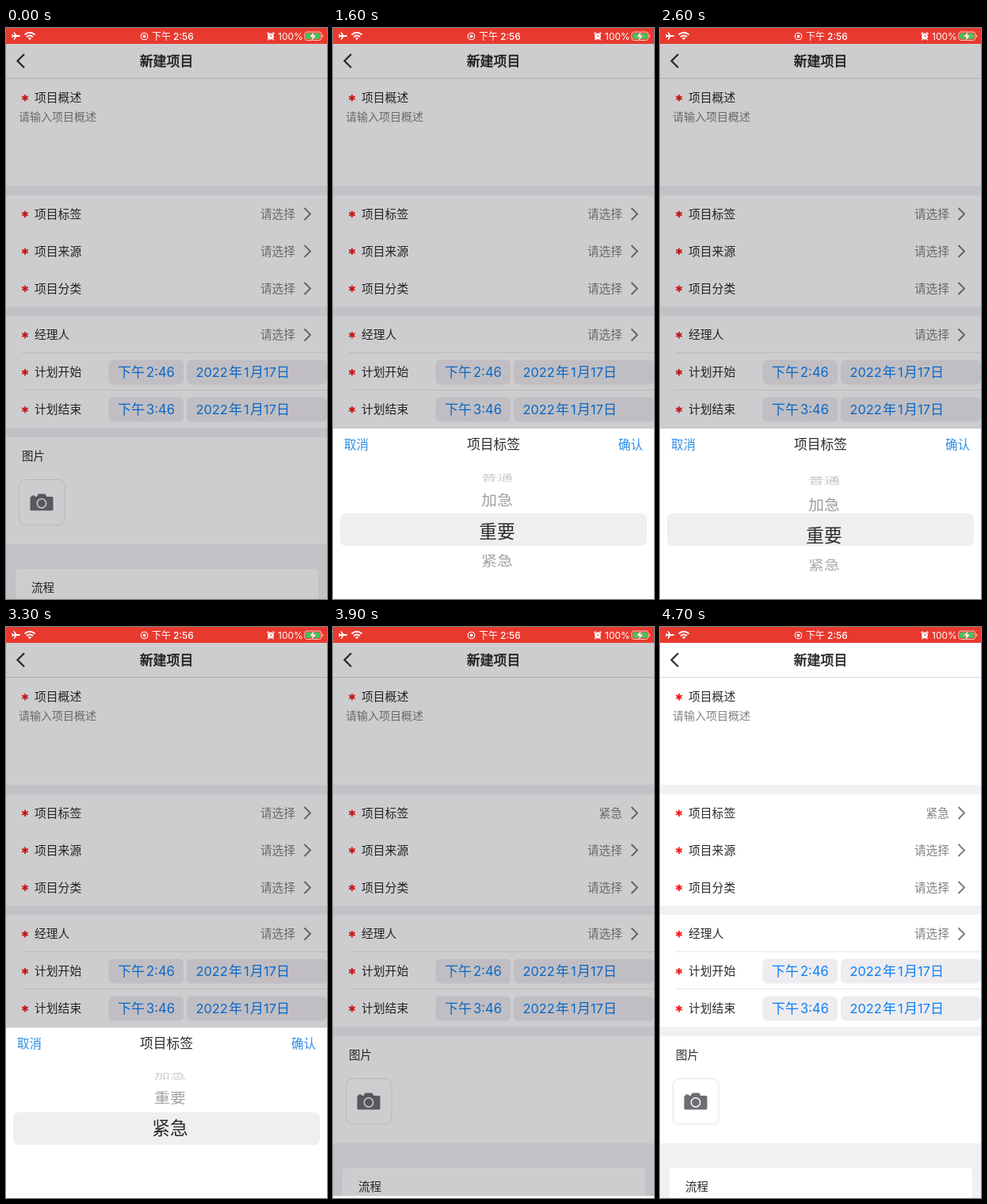
Recreate the animation shown at these times as an HTML page. Size 405 px wide and 720 px high, loop 4.8 s.

```html
<!DOCTYPE html>
<html lang="zh-CN">
<head>
<meta charset="utf-8">
<style>
html, body { margin: 0; width: 100%; height: 100%; overflow: hidden; background: #fff; }
svg { display: block; width: 405px; height: 720px; font-family: Inter, "Noto Sans CJK SC", sans-serif; }
</style>
</head>
<body>
<svg id="stage" viewBox="0 0 405 720"></svg>
<script>
const LOOP = 4800, STEP = 100;
const ITEMS = ['普通', '加急', '重要', '紧急'];
const WHEEL = { x: 207, y: 632, radius: 76.7, angle: 29.7 * Math.PI / 180 };
const INK = '#2b2b2d', GRAY = '#828284', BAND = '#f1f0f2', BLUE = '#0b80f5', RED = '#e8392f', PILL = '#eeecef';

const rect = (x, y, w, h, fill, r = 0, extra = '') =>
  `<rect x="${x}" y="${y}" width="${w}" height="${h}" rx="${r}" fill="${fill}" ${extra}/>`;
const line = (d, color, width, extra = '') =>
  `<path d="${d}" fill="none" stroke="${color}" stroke-width="${width}" ${extra}/>`;
// cy is the vertical middle of the glyphs
const text = (x, cy, size, str, fill = INK, extra = '') =>
  `<text x="${x}" y="${cy + size * 0.37}" font-size="${size}" fill="${fill}" ${extra}>${str}</text>`;
const MID = 'text-anchor="middle"', END = 'text-anchor="end"';

const label = (cy, str) =>
  line(`M24 ${cy - 4}v8.400M20.300 ${cy - 1.9}l7.400 4.200M20.300 ${cy + 2.3}l7.400-4.200`, '#f51a1a', 1.8) +
  text(36, cy, 14.8, str);
const choice = (cy, str, id = '') =>
  label(cy, str) + text(365, cy, 14.7, '请选择', GRAY, `${END} ${id}`) +
  line(`M376.5 ${cy - 7.5}l7.5 7.5-7.5 7.5`, '#77777a', 1.8);
const dateRow = (cy, str, time) => {
  const blue = (x, part, size = 17) => text(x, cy, size, part, BLUE);
  return label(cy, str) +
    rect(129.5, cy - 15.5, 94.5, 31, PILL, 6) + rect(228, cy - 15.5, 177, 31, PILL, 6) +
    blue(141, '下午') + blue(177, time, 16.6) +
    blue(239.5, '2022', 16.4) + blue(281, '年') + blue(300, '1', 16.4) +
    blue(308, '月') + blue(325, '17', 16.4) + blue(341, '日');
};

const statusBar = rect(0, 0, 405, 20, RED) +
  '<path d="M18 10q0-1-1.5-1h-3L10.5 5H9.5l1.5 4H9L8 7.8H7l.7 2.2L7 12.2h1L9 11h2l-1.5 4h1l3-4h3q1.5 0 1.5-1z" fill="#fff"/>' +
  line('M23.5 8.5q6.5-5.5 13 0M26 11.2q4-3.3 8 0', '#fff', 2) +
  '<path d="M27.8 12.8q2.2-1.6 4.4 0l-2.2 2.4z" fill="#fff"/>' +
  '<circle cx="174.5" cy="10.5" r="4.3" fill="none" stroke="#fff" stroke-width="1.1"/><circle cx="174.5" cy="10.5" r="1.9" fill="#fff"/>' +
  text(184, 10.5, 12, '下午', '#fff', 'font-weight="500"') + text(211, 10.5, 12, '2:56', '#fff', 'font-weight="500"') +
  '<circle cx="334" cy="10.5" r="3.9" fill="#fff"/>' +
  line('M329.5 7.5l2-2M338.5 7.5l-2-2M331.3 14l-1 1.2M336.7 14l1 1.2', '#fff', 1.4) +
  line('M334 8.3v2.4h1.8', RED, 0.9) +
  text(343, 10.5, 12, '100%', '#fff') +
  rect(376.8, 5, 21, 10.5, 'none', 3, 'stroke="#ffc6c2"') + rect(378.3, 6.5, 18, 7.5, '#42c65a', 1.8) +
  line('M399.5 8.8v3', '#ffc6c2', 1.3) +
  `<path d="M389 4l-6 7.2h3.6L385 17l6.5-7.8h-3.7z" fill="#fff" stroke="${RED}" stroke-width=".4"/>`;

const camera = rect(16.5, 569.5, 57.5, 57.5, '#fff', 8, 'stroke="#e3e2e5"') +
  '<path d="M32 591v-1.500h4.500v1.500h2l2.200-3.500h8.600l2.200 3.500H58q1.500 0 1.500 1.500v14.500q0 1.500-1.500 1.500h-26q-1.500 0-1.500-1.500v-14.500q0-1.500 1.500-1.500z" fill="#6f6d74"/>' +
  '<circle cx="45" cy="599.5" r="5.7" fill="none" stroke="#fff" stroke-width="1.5"/>';

const form = rect(0, 0, 405, 720, '#fff') +
  line('M23 33l-8.5 8.5 8.5 8.5', '#333', 2.3) +
  text(202.5, 41.5, 16.9, '新建项目', '#202022', `${MID} stroke="#202022" stroke-width=".5"`) +
  line('M0 63.5H405', '#d8d7d9', 1) +
  label(88, '项目概述') + text(16, 111.7, 14, '请输入项目概述', GRAY) +
  rect(0, 199, 405, 12, BAND) +
  choice(234.5, '项目标签', 'id="tag"') + choice(281.5, '项目来源') + choice(328.5, '项目分类') +
  rect(0, 351.5, 405, 11.5, BAND) +
  choice(387, '经理人') +
  line('M20 409.5H405M20 456.5H405', '#e9e8ea', 1) +
  dateRow(434, '计划开始', '2:46') + dateRow(481, '计划结束', '3:46') +
  rect(0, 504, 405, 12, BAND) +
  text(20, 540, 14.5, '图片') + camera +
  rect(0, 651, 405, 69, BAND) + rect(12, 682, 382, 50, '#fff', 5) +
  text(32, 706, 14.6, '流程');

const rows = (size, fill) => ITEMS.map(s =>
  `<g class="item"><text y="${size * 0.37}" font-size="${size}" fill="${fill}" ${MID}>${s}</text></g>`).join('');
const sheet = rect(0, 505, 405, 216, '#fff') +
  text(14, 525, 15.5, '取消', '#2f8fe8') +
  text(202.5, 525, 16.8, '项目标签', INK, MID) +
  text(391, 525, 15.5, '确认', '#2f8fe8', END) +
  rect(9, 612, 387, 41, '#efeef1', 7) +
  `<g clip-path="url(#outer)">${rows(20, '#8c8c90')}</g><g clip-path="url(#inner)">${rows(22.7, '#2a2a2c')}</g>`;

const $ = id => document.getElementById(id);
$('stage').innerHTML =
  '<clipPath id="outer"><path d="M0 562H405V612H0zM0 653H405V704H0z"/></clipPath>' +
  '<clipPath id="inner"><path d="M0 612H405V653H0z"/></clipPath>' +
  form + rect(0, 20, 405, 700, '#04000c', 0, 'id="shade" opacity=".195"') + statusBar +
  `<g id="sheet">${sheet}</g>`;
const items = [...document.querySelectorAll('.item')];

const clamp = v => Math.min(1, Math.max(0, v));
const smooth = (t, a, b) => { const p = clamp((t - a) / (b - a)); return p * p * (3 - 2 * p); };

function draw(t) {
  const opened = 1 - (1 - clamp(t / 300)) ** 2;
  const drop = 215 * (1 - opened + smooth(t, 3600, 3920));
  $('sheet').setAttribute('transform', `translate(0 ${drop})`);
  $('shade').style.display = t < 3950 ? '' : 'none';
  $('tag').textContent = t < 3650 ? '请选择' : '紧急';

  const pos = 3 * (smooth(t, 250, 680) - smooth(t, 1300, 2050) + smooth(t, 2050, 3020));
  items.forEach((el, i) => {
    const a = (i % ITEMS.length - pos) * WHEEL.angle, c = Math.cos(a);
    const seen = Math.abs(a) < 1.5;
    el.style.display = seen ? '' : 'none';
    el.setAttribute('transform', `translate(${WHEEL.x} ${WHEEL.y + WHEEL.radius * Math.sin(a)}) scale(1 ${c})`);
    el.setAttribute('opacity', i < ITEMS.length ? clamp(c * 1.05 - 0.1) : 1);
  });
}

const start = performance.now();
function tick() {
  const t = (performance.now() - start) % LOOP;
  draw(Math.floor(t / STEP) * STEP);
  requestAnimationFrame(tick);
}
tick();
</script>
</body>
</html>
```
